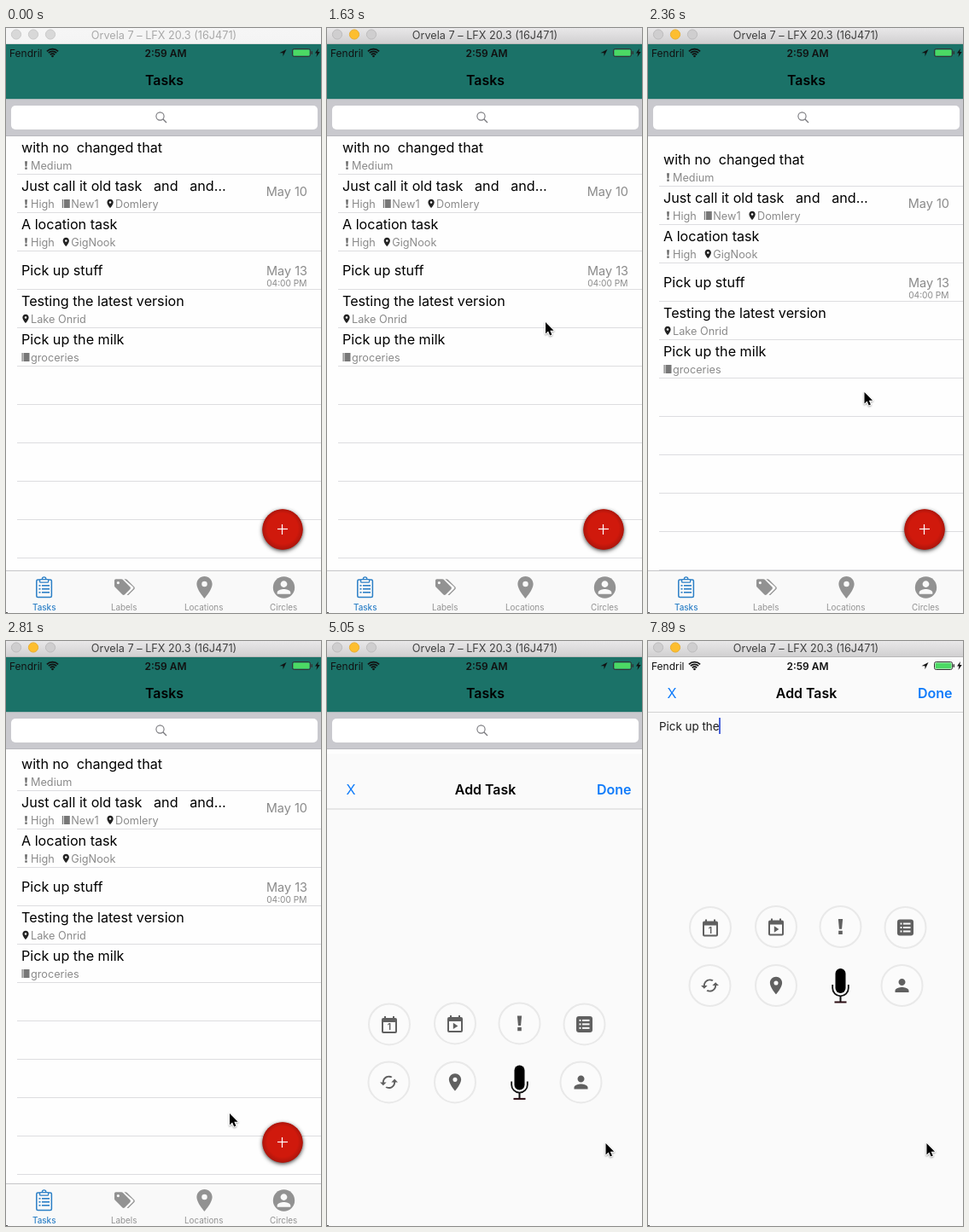
An HTML page with a canvas for the animation above (8000 ms loop, 369 by 686 pixels).

```html
<!DOCTYPE html>
<html lang="en">
<head>
<meta charset="utf-8">
<title>Task list</title>
<style>
  html, body { margin: 0; width: 100%; height: 100%; overflow: hidden; background: #fff; }
  canvas { display: block; width: 369px; height: 686px; }
</style>
</head>
<body>
<canvas id="stage"></canvas>
<script>
const W = 369, H = 686, LOOP = 8000;
const canvas = document.getElementById('stage');
const ctx = canvas.getContext('2d');
const dpr = window.devicePixelRatio || 1;
canvas.width = W * dpr;
canvas.height = H * dpr;

const BLUE = '#0f7bfa', TAB_BLUE = '#2b7fc6', GREY = '#8a8a8a', TAB_GREY = '#929292';
const TEAL = '#1b7268', ICON = '#606060';

// Icons on a 24 unit grid
const PIN = new Path2D('M12 2C8.1 2 5 5.1 5 9c0 5.3 7 13 7 13s7-7.7 7-13c0-3.9-3.1-7-7-7zm0 9.5a2.5 2.5 0 1 1 0-5 2.5 2.5 0 0 1 0 5z');
const PERSON = new Path2D('M12 12c2.2 0 4-1.8 4-4s-1.8-4-4-4-4 1.8-4 4 1.8 4 4 4zm0 2c-2.7 0-8 1.3-8 4v2h16v-2c0-2.7-5.3-4-8-4z');
const CALENDAR = new Path2D('M19 4h-1V2h-2v2H8V2H6v2H5a2 2 0 0 0-2 2v14a2 2 0 0 0 2 2h14a2 2 0 0 0 2-2V6a2 2 0 0 0-2-2zm0 16H5V9h14z');
const PLAY = new Path2D('M9.8 10.8v7.4l5.6-3.7z');
const BANG = new Path2D('M9.5 3.5h5l-1 11h-3zM9.8 16.5h4.4v4h-4.4z');
const SYNC = new Path2D('M12 4V1L8 5l4 4V6c3.3 0 6 2.7 6 6 0 1-.25 2-.7 2.8l1.46 1.46C19.5 15 20 13.6 20 12c0-4.4-3.6-8-8-8zm0 14c-3.3 0-6-2.7-6-6 0-1 .25-2 .7-2.8L5.24 7.74C4.5 9 4 10.4 4 12c0 4.4 3.6 8 8 8v3l4-4-4-4z');
const TAGS = new Path2D('M1 4.5C1 3.7 1.7 3 2.5 3h6c.5 0 1 .2 1.4.6l8 8c.6.6.6 1.6 0 2.2l-6 6c-.6.6-1.6.6-2.2 0l-8-8C1.2 11.4 1 11 1 10.5zM5 5.5a1.5 1.5 0 1 0 0 3 1.5 1.5 0 0 0 0-3zM11.5 3H13c.5 0 1 .2 1.4.6l8 8c.6.6.6 1.6 0 2.2l-6 6c-.6.6-1.3.6-1.9.2l6.5-6.5c.8-.8.8-1.5 0-2.3z');
const ARROW = new Path2D('M0 0v13.4l3.1-2.9 2.1 4.9 2.2-.9-2.1-4.8h4.3z');
const BOLT = new Path2D('M4 0L0 5.5h2.4L1.5 10l4.2-5.9H3.2z');
const COMPASS = new Path2D('M8 0L0 4.2h4V8.2z');

const ROWS = [
  { title: 'with no  changed that', tags: [['bang', 'Medium']] },
  { title: 'Just call it old task   and   and…', tags: [['bang', 'High'], ['book', 'New1'], ['pin', 'Domlery']], date: 'May 10' },
  { title: 'A location task', tags: [['bang', 'High'], ['pin', 'GigNook']] },
  { title: 'Pick up stuff', tags: [], date: 'May 13', time: '04:00 PM' },
  { title: 'Testing the latest version', tags: [['pin', 'Lake Onrid']] },
  { title: 'Pick up the milk', tags: [['book', 'groceries']] }
];

// Each entry holds until the next: time, pointer x, pointer y, list offset
const POINTER = [
  [890, 276, 610, 0], [1040, 269, 534, 0], [1190, 261, 457, 0], [1340, 257.5, 419, 0],
  [1480, 257, 391, 0], [1630, 256, 345, 0], [1780, 256, 323, -2], [1920, 255.5, 318, -5],
  [2070, 255, 349, 2], [2220, 254, 399, 9], [2360, 253.5, 427, 14], [2510, 255, 454, 14],
  [2660, 258, 504, 9], [2810, 262, 554, 4], [2950, 267, 596, 1], [3100, 271, 617, 0],
  [3250, 277, 624, 0], [3400, 297, 614, 0], [3550, 316, 595, 0], [3700, 325, 583, 0],
  [3850, 326.5, 589, 0]
];
// Share of the sheet still below the screen
const SHEET = [[0, 1], [4750, .9], [4900, .5], [5050, .17], [5200, .05], [5340, .015], [5490, .004], [5640, 0]];
const TYPED = [[6090, ''], [6390, 'P'], [6540, 'Pi'], [6690, 'Pick'], [7290, 'Pick '], [7590, 'Pick up'], [7740, 'Pick up t'], [7890, 'Pick up the']];

const at = (steps, t) => steps.filter(s => s[0] <= t).pop();

function text(str, x, y, size, color, { align = 'left', weight = 400 } = {}) {
  ctx.font = `${weight} ${size}px Inter, sans-serif`;
  ctx.textAlign = align;
  ctx.fillStyle = color;
  ctx.fillText(str, x, y);
  return ctx.measureText(str).width;
}

function rect(x, y, w, h, color, r = 0) {
  ctx.fillStyle = color;
  ctx.beginPath();
  ctx.roundRect(x, y, w, h, r);
  ctx.fill();
}

function disc(x, y, r, fill, line, width = 1) {
  ctx.beginPath();
  ctx.arc(x, y, r, 0, Math.PI * 2);
  ctx.fillStyle = fill;
  ctx.fill();
  if (line) stroke(line, width);
}

function stroke(color, width) {
  ctx.strokeStyle = color;
  ctx.lineWidth = width;
  ctx.stroke();
}

function line(x1, y1, x2, y2, color, width = 1) {
  ctx.beginPath();
  ctx.moveTo(x1, y1);
  ctx.lineTo(x2, y2);
  stroke(color, width);
}

function icon(path, x, y, scale, color, turn = 0) {
  ctx.save();
  ctx.translate(x, y);
  ctx.rotate(turn);
  ctx.scale(scale, scale);
  ctx.translate(-12, -12);
  ctx.fillStyle = color;
  ctx.fill(path, 'evenodd');
  ctx.restore();
}

function shape(path, x, y, color) {
  ctx.save();
  ctx.translate(x, y);
  ctx.fillStyle = color;
  ctx.fill(path);
  ctx.restore();
}

function windowBar(active) {
  const g = ctx.createLinearGradient(0, 0, 0, 18);
  g.addColorStop(0, active ? '#e9e8e9' : '#f6f6f6');
  g.addColorStop(1, active ? '#d1d0d1' : '#f4f4f4');
  rect(0, 0, W, 19, g);
  rect(0, 18, W, 1, active ? '#b9b8b9' : '#dcdcdc');
  const off = active ? '#cfcecf' : '#d8d8d8', rim = active ? '#bdbcbd' : '#cacaca';
  disc(12, 7.5, 5.6, off, rim);
  disc(32, 7.5, 5.6, active ? '#fdbe2f' : off, active ? '#e9ae30' : rim);
  disc(52, 7.5, 5.6, off, rim);
  text('Orvela 7 – LFX 20.3 (16J471)', 185, 13, 12.7, active ? '#404040' : '#a9a9a9', { align: 'center' });
}

function statusBar() {
  text('Fendril', 4, 33.5, 12, '#111');
  for (const r of [3.8, 6.7, 9.3]) {
    ctx.beginPath();
    ctx.arc(54.5, 34, r, -Math.PI * .75, -Math.PI * .25);
    stroke('#111', 1.7);
  }
  disc(54.5, 33, 1.3, '#111');
  text('2:59 AM', 187, 33.5, 12, '#111', { align: 'center', weight: 600 });
  shape(COMPASS, 320.5, 25, '#111');
  ctx.beginPath();
  ctx.roundRect(335.5, 24.5, 21, 9, 2);
  stroke('#333', 1);
  rect(336.5, 25.5, 19, 7, '#4cd964', 1);
  rect(357.5, 27, 1.5, 4, '#333', 1);
  shape(BOLT, 362, 24, '#111');
}

function tagIcon(kind, x, y) {
  if (kind === 'bang') icon(BANG, x + 5.5, y, .56, '#666');
  if (kind === 'pin') icon(PIN, x + 5, y, .52, '#222');
  if (kind === 'book') {
    rect(x + .5, y - 5, 1.2, 10, '#777');
    rect(x + 2.5, y - 5, 7, 10, '#777');
  }
}

function list(offset) {
  ctx.save();
  ctx.beginPath();
  ctx.rect(0, 127, W, 509);
  ctx.clip();
  ctx.translate(0, offset);
  for (let i = 0; i < 12; i++) {
    const y = 126 + 45 * i;
    rect(13, y + 45, W - 13, 1, '#dddde0');
    const row = ROWS[i];
    if (!row) continue;
    text(row.title, 18, y + (row.tags.length ? 20 : 29), 16.15, '#000');
    let x = 18;
    for (const [kind, label] of row.tags) {
      tagIcon(kind, x, y + 35);
      x += 11 + text(label, x + 11, y + 39.5, 12.7, GREY) + 8.5;
    }
    if (row.date) text(row.date, 353, y + (row.time ? 29 : 25.5), 14.5, GREY, { align: 'right' });
    if (row.time) text(row.time, 352.5, y + 42, 10.2, GREY, { align: 'right' });
  }
  ctx.restore();
}

function addButton() {
  ctx.save();
  ctx.shadowColor = 'rgba(0,0,0,.8)';
  ctx.shadowBlur = 5 * dpr;
  ctx.shadowOffsetY = 1.5 * dpr;
  disc(324, 588, 23.5, '#cb180c');
  ctx.restore();
  const g = ctx.createRadialGradient(324, 587, 18, 324, 588, 24);
  g.addColorStop(0, '#d0190c');
  g.addColorStop(1, '#ab150c');
  disc(324, 588, 23.7, g);
  line(318, 587.5, 330, 587.5, '#fff', 1.2);
  line(323.5, 582, 323.5, 594, '#fff', 1.2);
}

function clipboard() {
  ctx.beginPath();
  ctx.roundRect(35.8, 647, 17.6, 20.6, 1.5);
  stroke(TAB_BLUE, 1.5);
  disc(44.6, 646, 2.2, '#f9f9f9', TAB_BLUE, 1.3);
  ctx.beginPath();
  ctx.roundRect(39.6, 646.6, 10, 3.6, 1);
  ctx.fillStyle = '#f9f9f9';
  ctx.fill();
  stroke(TAB_BLUE, 1.3);
  for (const y of [653, 657, 661]) {
    rect(38.5, y, 2, 1.6, TAB_BLUE);
    rect(42, y, 9, 1.6, TAB_BLUE);
  }
}

function tabBar() {
  rect(0, 636, W, 50, '#f9f9f9');
  rect(0, 636, W, 1, '#c6c6c8');
  clipboard();
  icon(TAGS, 139, 656, 1.09, TAB_GREY);
  icon(PIN, 232.5, 656, 1.3, TAB_GREY);
  disc(325.5, 656, 12.7, TAB_GREY);
  icon(PERSON, 325.5, 656, .98, '#f9f9f9');
  ['Tasks', 'Labels', 'Locations', 'Circles'].forEach((name, i) =>
    text(name, 44.7 + 93.5 * i, 682.5, 9.9, i ? TAB_GREY : TAB_BLUE, { align: 'center', weight: i ? 400 : 500 }));
}

function navTitle(str) {
  text(str, 185.5, 67, 15.9, '#000', { align: 'center', weight: 600 });
}

function tasksScreen(offset) {
  rect(0, 19, W, H, '#fefefe');
  list(offset);
  rect(0, 19, W, 64, TEAL);
  rect(0, 83, W, 44, '#c9c9ce');
  rect(0, 83, W, 1, '#a9b9b9');
  rect(0, 126, W, 1, '#b9b9be');
  rect(6, 91, 359, 28, '#fff', 5);
  ctx.beginPath();
  ctx.arc(180.5, 103.5, 4.6, 0, Math.PI * 2);
  stroke('#77777c', 1.1);
  line(183.8, 106.8, 188, 111, '#77777c', 1.3);
  navTitle('Tasks');
  addButton();
  tabBar();
}

function listIcon(x, y) {
  rect(x - 9.5, y - 9.5, 19, 19, ICON, 3);
  for (const dy of [-4.5, 0, 4.5]) {
    rect(x - 6, y + dy - 1, 2, 2, '#fafafa');
    rect(x - 2.5, y + dy - 1, 8.5, 2, '#fafafa');
  }
}

function mic(x) {
  rect(x - 6, 384, 12, 29, '#000', 6);
  ctx.beginPath();
  ctx.moveTo(x - 9.3, 403);
  ctx.lineTo(x - 9.3, 407);
  ctx.arc(x, 407, 9.3, Math.PI, 0, true);
  ctx.lineTo(x + 9.3, 403);
  stroke('#111', 1.8);
  rect(x - 1, 416, 2, 7, '#111');
  rect(x - 7, 422.5, 14, 2, '#2a0c12');
}

function taskTools() {
  const spots = [[73, 336], [150, 335], [225.5, 335], [301.5, 336], [72.5, 404], [150, 404], [297.5, 404]];
  for (const [x, y] of spots) disc(x, y, 24, '#fbfbfb', '#e9e9e9', 2);
  icon(CALENDAR, 73, 336.5, 1, ICON);
  text('1', 73, 343, 10, ICON, { align: 'center', weight: 700 });
  icon(CALENDAR, 150, 335.5, 1, ICON);
  icon(PLAY, 150, 335.5, 1, ICON);
  icon(BANG, 225.5, 335, 1.05, ICON);
  listIcon(301.5, 336);
  icon(SYNC, 72.5, 404, .95, ICON, Math.PI / 2);
  icon(PIN, 150, 404, 1.02, ICON);
  icon(PERSON, 297.5, 404, 1, ICON);
  mic(225.5);
}

function addScreen(share, typed) {
  ctx.save();
  ctx.beginPath();
  ctx.rect(0, 19, W, H - 19);
  ctx.clip();
  ctx.translate(0, share * (H - 19));
  rect(0, 19, W, H, '#fafafa');
  rect(0, 83, W, 1, '#d3d3d3');
  text('X', 28, 67, 16.2, BLUE, { align: 'center' });
  navTitle('Add Task');
  text('Done', 356.5, 67, 16, BLUE, { align: 'right', weight: 600 });
  taskTools();
  if (typed) {
    const w = text(typed[1], 13, 105, 13.4, '#1c1c1c');
    rect(Math.round(12 + w), 90, 2, 19, '#4963dc');
  }
  ctx.restore();
}

function pointer(x, y) {
  ctx.save();
  ctx.translate(x, y);
  ctx.shadowColor = 'rgba(0,0,0,.35)';
  ctx.shadowBlur = 2 * dpr;
  ctx.shadowOffsetY = dpr;
  ctx.lineJoin = 'round';
  ctx.strokeStyle = '#fff';
  ctx.lineWidth = 2;
  ctx.stroke(ARROW);
  ctx.shadowColor = 'transparent';
  ctx.fillStyle = '#000';
  ctx.fill(ARROW);
  ctx.restore();
}

function draw(t) {
  ctx.setTransform(dpr, 0, 0, dpr, 0, 0);
  const hand = at(POINTER, t);
  const share = at(SHEET, t)[1];
  if (share > 0) tasksScreen(hand ? hand[3] : 0);
  if (share < 1) addScreen(share, at(TYPED, t));
  statusBar();
  windowBar(Boolean(hand));
  rect(0, 685, 2, 1, '#555');
  if (hand) pointer(hand[1], hand[2]);
}

const start = performance.now();
function tick() {
  draw((performance.now() - start) % LOOP);
  requestAnimationFrame(tick);
}
tick();
</script>
</body>
</html>
```
